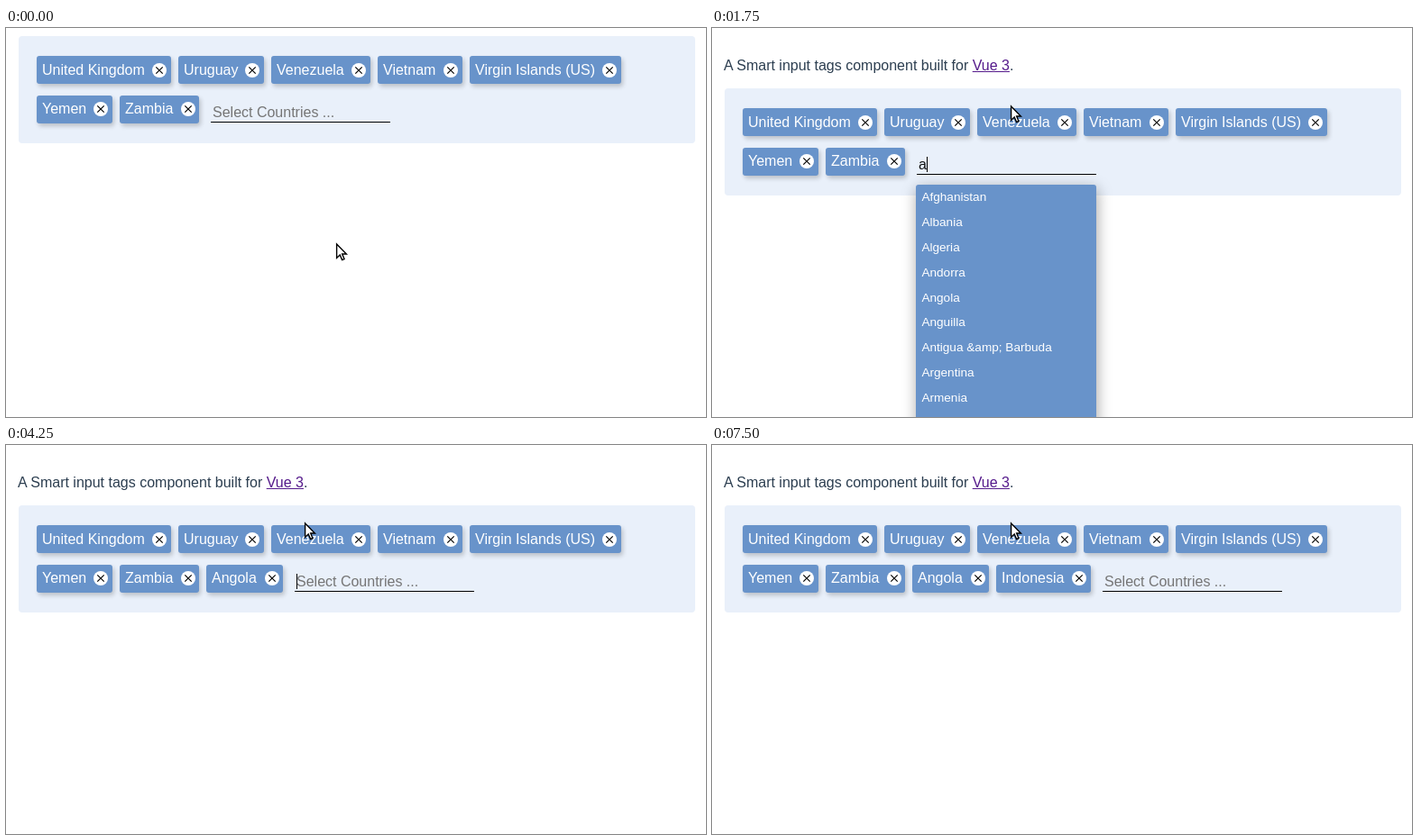
Animation of 776 by 432 pixels, one loop 8000 ms. Source, as an HTML page:

```html
<!DOCTYPE html>
<html lang="en">
<head>
<meta charset="utf-8">
<title>Tag input</title>
<style>
  html, body { margin: 0; width: 100%; height: 100%; overflow: hidden; background: #fff; }
  body { position: relative; font: 16px/17px "Liberation Sans", Arial, sans-serif; }
  #page, #page div, #page span, #page svg, .cursor { position: absolute; white-space: pre; }
  #page { left: 0; top: 0; width: 776px; height: 432px; }
  #intro { left: 13px; top: -25px; color: #2c3e50; }
  #intro u { color: #551a8b; }
  #panel { left: 14px; top: 9px; width: 750px; height: 119px; border-radius: 4px; background: #e9f0fa; }
  #tags { left: 0; top: 0; }
  .tag { height: 31px; border-radius: 3px; background: #6893ca; color: #fff; box-shadow: 2px 3px 5px rgba(0, 0, 0, .2); }
  .tag span { left: 6px; }
  #field { top: 80px; width: 199px; height: 24px; border-bottom: 1px solid #000; }
  #value { left: 2px; top: 5px; }
  #caret { top: 5px; width: 1px; height: 17px; background: #000; }
  #list { top: 116px; width: 200px; border-radius: 3px; overflow: hidden; background: #6893ca;
    box-shadow: 1px 4px 16px rgba(0, 0, 0, .36); }
  #list div { left: 0; width: 200px; height: 27.8px; color: #fff; font-size: 13.6px; line-height: 15px; }
  #list span { left: 6.4px; top: 6.4px; }
  #list .on { background: #7ba0d0; }
  .cursor { left: 0; top: 0; overflow: visible; }
</style>
</head>
<body>
<div id="page">
  <div id="intro">A Smart input tags component built for <u>Vue 3</u>.</div>
  <div id="panel"></div>
  <div id="tags"></div>
  <div id="field"><span id="value"></span><div id="caret"></div></div>
  <div id="list"></div>
</div>
<svg class="cursor" id="arrow" width="13" height="20">
  <path d="M.6 .9V16.4L4.2 13L6.6 18.5L9 17.5L6.7 12H11.4Z" fill="#fff" stroke="#000" stroke-width="1.4"/>
</svg>
<svg class="cursor" id="beam" width="9" height="16" fill="none">
  <path d="M1 .5H3.5L4.5 1.5L5.5 .5H8M4.5 1.5V14.5M1 15.5H3.5L4.5 14.5L5.5 15.5H8" stroke="#fff" stroke-opacity=".7" stroke-width="2.4"/>
  <path d="M1 .5H3.5L4.5 1.5L5.5 .5H8M4.5 1.5V14.5M1 15.5H3.5L4.5 14.5L5.5 15.5H8" stroke="#444"/>
</svg>
<script>
const LOOP = 8000, ROW = 27.8;
const $ = id => document.getElementById(id);

// label, left, width, row
const TAGS = [
  ["United Kingdom", 34, 149, 0], ["Uruguay", 191, 95, 0], ["Venezuela", 294, 110, 0],
  ["Vietnam", 412, 94, 0], ["Virgin Islands (US)", 514, 168, 0],
  ["Yemen", 34, 84, 1], ["Zambia", 126, 88.4, 1], ["Angola", 222, 85.4, 1], ["Indonesia", 315, 105, 1]
];
const FIELD_X = { 7: 227, 8: 320, 9: 433 };
const MATCHES = {
  a: ["Afghanistan", "Albania", "Algeria", "Andorra", "Angola", "Anguilla",
      "Antigua &amp; Barbuda", "Argentina", "Armenia", "Aruba"],
  in: ["India", "Indonesia"]
};
const CARET_X = { "": 2, a: 11, in: 14 };

// each step changes part of the state and holds until the next
const STEPS = [
  [0, { scroll: 0, cursor: "arrow", x: 366, y: 239, tags: 7, text: "", caret: 0, row: -1 }],
  [250, { x: 344, y: 172 }],
  [500, { x: 338, y: 140 }],
  [750, { cursor: "beam", x: 340, y: 91 }],
  [1000, { x: 337, y: 88, caret: 1 }],
  [1250, { scroll: 56 }],
  [1500, { scroll: 58, x: 331, y: 82, caret: 0 }],
  [1750, { cursor: "arrow", x: 331, y: 86, text: "a", caret: 1 }],
  [2250, { row: 0, caret: 0 }],
  [2500, { row: 1 }],
  [2750, { row: 3, caret: 1 }],
  [3000, { row: 5 }],
  [3250, { caret: 0 }],
  [3750, { row: 4, caret: 1 }],
  [4250, { tags: 8, text: "", row: -1 }],
  [4750, { caret: 0 }],
  [5250, { caret: 1 }],
  [5500, { text: "in" }],
  [6000, { row: 1 }],
  [6250, { caret: 0 }],
  [6750, { caret: 1 }],
  [7000, { tags: 9, text: "", row: -1 }],
  [7500, { caret: 0 }]
];

function add(parent, kind, text) {
  const el = document.createElement(kind);
  if (text) el.textContent = text;
  return parent.appendChild(el);
}

const tagEls = TAGS.map(([label, x, w, row]) => {
  const el = add($("tags"), "div");
  el.className = "tag";
  el.style.cssText = `left:${x}px;top:${31 + row * 44}px;width:${w}px`;
  add(el, "span", label).style.top = 7 - row + "px";
  el.insertAdjacentHTML("beforeend",
    `<svg width="16" height="16" style="left:${Math.round(w - 20.9)}px;top:${8 - row}px">
      <circle cx="8" cy="8" r="8" fill="#fff"/>
      <path d="M4.3 4.3L11.7 11.7M11.7 4.3L4.3 11.7" stroke="#000" stroke-width="1.2"/></svg>`);
  return el;
});

function drawList(s) {
  const list = $("list"), items = MATCHES[s.text] || [];
  list.replaceChildren();
  list.hidden = !items.length;
  list.style.left = FIELD_X[s.tags] - 1 + "px";
  list.style.height = items.length * ROW + "px";
  items.forEach((name, i) => {
    const el = add(list, "div");
    el.style.top = i * ROW + "px";
    el.classList.toggle("on", i === s.row);
    add(el, "span", name);
  });
}

function draw(s) {
  $("page").style.top = s.scroll + "px";
  tagEls.forEach((el, i) => el.hidden = i >= s.tags);
  $("field").style.left = FIELD_X[s.tags] + "px";
  $("value").textContent = s.text || "Select Countries ...";
  $("value").style.color = s.text ? "#111" : "#757575";
  $("caret").style.left = CARET_X[s.text] + "px";
  $("caret").hidden = !s.caret;
  drawList(s);
  for (const id of ["arrow", "beam"]) {
    $(id).style.display = id === s.cursor ? "block" : "none";
    $(id).style.transform = `translate(${s.x}px,${s.y}px)`;
  }
}

const states = [];
STEPS.forEach(([, change], i) => states.push({ ...states[i - 1], ...change }));

let shown = -1;
function tick() {
  const t = performance.now() % LOOP;
  const i = STEPS.filter(([at]) => at <= t).length - 1;
  if (i !== shown) draw(states[shown = i]);
  requestAnimationFrame(tick);
}
tick();
</script>
</body>
</html>
```
